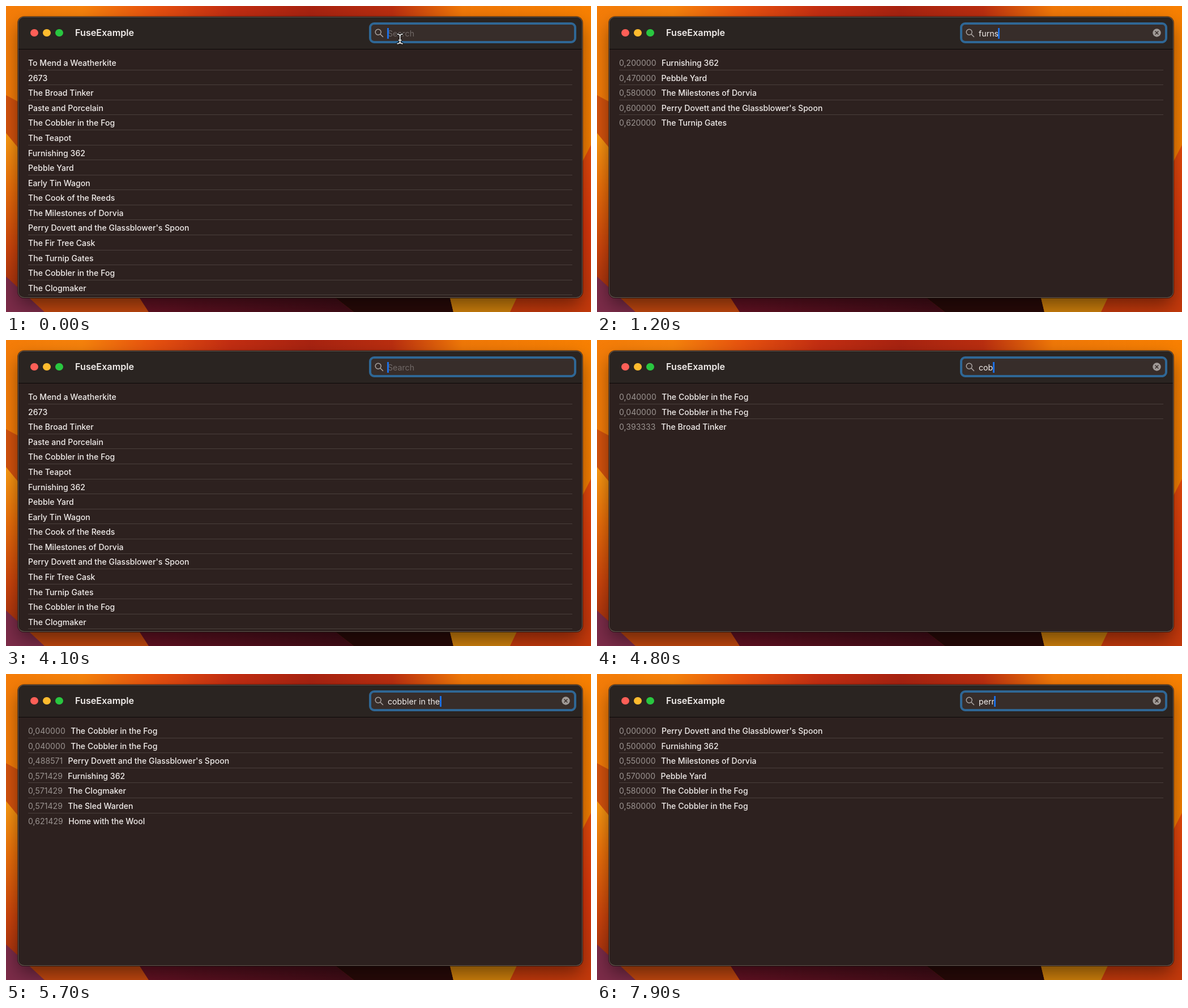
An HTML page that plays this animation: 1033 px wide and 542 px high, repeating every 8000 ms.

```html
<!DOCTYPE html>
<html lang="en">
<head>
<meta charset="utf-8">
<title>FuseExample</title>
<style>
html, body { margin: 0; width: 100%; height: 100%; overflow: hidden; background: #b5360f; }
body { position: relative; font: 450 14.1px/27px Inter, sans-serif; color: #f1edeb; }
body > *, .win > *, .bar > *, .field > * { position: absolute; }
.win {
  left: 22px; top: 20px; width: 995px; height: 496px; border-radius: 10px; background: #2d211f;
  box-shadow: 0 0 0 1px #65584f, 0 0 0 2px rgba(0,0,0,.55), 0 14px 32px rgba(0,0,0,.45);
  overflow: hidden;
}
.bar { left: 0; top: 0; width: 100%; height: 56px; background: #2a2421; border-bottom: 1px solid #0c0807; }
.dot { top: 21px; width: 13.4px; height: 13.4px; border-radius: 50%; }
h1 { margin: 0; left: 100px; top: 14px; font-size: 16.2px; font-weight: 600; line-height: 27px; }
.field {
  left: 619px; top: 9px; width: 358px; height: 29px; border: 4px solid #2f6795;
  border-radius: 9px; background: #372d2a;
}
#hint, #query { left: 29px; top: 2px; white-space: pre; font-weight: 400; font-size: 14.2px; }
#hint { color: #716967; }
#query .sel { background: #3f638b; }
#caret { top: 6px; width: 3px; height: 19px; background: #1c6fe4; }
#list { left: 17px; top: 67.2px; width: 961px; }
.row { height: 25.57px; border-bottom: 1px solid #4a3f3c; white-space: pre; }
.found .row:last-child { border-color: transparent; }
.row b { font-weight: 400; color: #9a9390; margin-right: 9.4px; }
</style>
</head>
<body>
<svg width="1033" height="542" viewBox="0 0 1033 542">
  <defs>
    <linearGradient id="top">
      <stop offset="0" stop-color="#f47c08"/><stop offset=".13" stop-color="#f6820c"/>
      <stop offset=".25" stop-color="#e8520f"/><stop offset=".38" stop-color="#c42e12"/>
      <stop offset=".52" stop-color="#a82311"/><stop offset=".66" stop-color="#ba2e10"/>
      <stop offset=".78" stop-color="#f07808"/><stop offset="1" stop-color="#f88002"/>
    </linearGradient>
    <linearGradient id="left" x2="0" y2="1">
      <stop offset="0" stop-color="#fc9c12"/><stop offset=".3" stop-color="#ec700a"/>
      <stop offset=".65" stop-color="#cc440c"/><stop offset="1" stop-color="#962a10"/>
    </linearGradient>
    <linearGradient id="right" x2="0" y2="1">
      <stop offset="0" stop-color="#e84c0c"/><stop offset=".5" stop-color="#de380c"/>
      <stop offset="1" stop-color="#c43a0c"/>
    </linearGradient>
    <linearGradient id="low">
      <stop offset="0" stop-color="#661224"/><stop offset="1" stop-color="#420d17"/>
    </linearGradient>
  </defs>
  <path fill="url(#top)" d="M0 0H1033V542H0z"/>
  <path fill="#d4520d" d="M0 158L60 190V300H0z"/>
  <path fill="url(#left)" d="M0 225L260 542H0z"/>
  <path fill="#c2480f" d="M20 500H225L252 542H60z"/>
  <path fill="#7c2c49" d="M0 479L68 542H0z"/>
  <path fill="url(#low)" d="M225 500H560L614 542H252z"/>
  <path fill="#280a08" d="M560 500H780L790 542H614z"/>
  <path fill="#d0810c" d="M780 500H910L890 542H790z"/>
  <path fill="url(#right)" d="M1033 246L990 330L910 500L890 542H1033z"/>
</svg>

<div class="win">
  <div class="bar">
    <i class="dot" style="left:21.3px;background:#fe5f57"></i>
    <i class="dot" style="left:43.3px;background:#febb2e"></i>
    <i class="dot" style="left:65.3px;background:#29c740"></i>
    <h1>FuseExample</h1>
    <div class="field">
      <svg width="358" height="29" fill="none" stroke-linecap="round">
        <path d="M17.2 13.3a5 5 0 1 0-10 0a5 5 0 1 0 10 0M16 17l4.5 4.5" stroke="#aaa4a1" stroke-width="1.5"/>
        <g id="clear">
          <circle cx="343.5" cy="14.5" r="7.2" fill="#a09a97"/>
          <path d="M341 12l5 5m0-5l-5 5" stroke="#372d2a" stroke-width="1.5"/>
        </g>
      </svg>
      <div id="hint">Search</div>
      <div id="query"><span></span></div>
      <i id="caret"></i>
    </div>
  </div>
  <div id="list"></div>
</div>

<svg id="pointer" style="left:687px;top:47px" width="18" height="22" fill="none" stroke-linecap="round">
  <defs>
    <path id="beam" d="M4 2.8Q8.7 2.8 8.7 6.5V16Q8.7 19.7 4 19.7M13.4 2.8Q8.7 2.8 8.7 6.5M13.4 19.7Q8.7 19.7 8.7 16M6.2 13.5H11.2"/>
  </defs>
  <use href="#beam" stroke="#111" stroke-width="3.8"/>
  <use href="#beam" stroke="#fff" stroke-width="1.6"/>
</svg>

<script>
const titles = [
  "To Mend a Weatherkite", "2673", "The Broad Tinker", "Paste and Porcelain",
  "The Cobbler in the Fog", "The Teapot", "Furnishing 362", "Pebble Yard",
  "Early Tin Wagon", "The Cook of the Reeds", "The Milestones of Dorvia",
  "Perry Dovett and the Glassblower's Spoon", "The Fir Tree Cask", "The Turnip Gates",
  "The Cobbler in the Fog", "The Clogmaker", "Home with the Wool", "The Sled Warden"
];

// Result lists: "title score" pairs, best match first
const pair = "4 .04,14 .04";
const tail = ",16 .6,17 .6";
const crowd = pair + [11, 6, 15, 17, 16, 2, 9, 10, 0, 3, 12, 13, 7, 8]
  .map((n, i) => `,${n} ${.5 + i / 100}`).join("");
const inThe = pair + ",11 .488571,6 .571429,15 .571429,17 .571429,16 .621429";
const inFog = pair + ",11 .504444,15 .555556,17 .595556";

// time, query, results (none = whole library), mode
const steps = [
  [0, "", "", "pointer"],
  [300, "f", "6 0,7 .07,9 .1,10 .16"],
  [500, "fu", "6 0,7 .07,11 .51,8 .52,15 .54,4 .55,14 .55,12 .55,3 .56,0 .58,9 .6,2 .61,13 .62,10 .66"],
  [700, "fur", "6 0,7 .403333"],
  [900, "furn", "6 0,7 .32,11 .5,10 .55"],
  [1000, "furn", "6 0,7 .32,11 .5,10 .55,13 .57"],
  [1200, "furns", "6 .2,7 .47,10 .58,11 .6,13 .62"],
  [1300, "furnsi", "6 .166667" + tail],
  [1700, "furnsih", "6 .285714" + tail],
  [1800, "furnsihi", "6 .25" + tail],
  [1900, "furnsihin", "6 .222222" + tail],
  [2100, "furnsihing", "6 .2" + tail],
  [2200, "furnsihing ", "6 .2" + tail],
  [2500, "furnsihing 3", "6 .166667" + tail],
  [2700, "furnsihing 36", "6 .153846"],
  [2900, "furnsihing 362", "6 .142857"],
  [3400, "furnsihing 362", "6 .142857", "blink"],
  [3600, "furnsihing 362", "6 .142857", "select"],
  [3700, "", ""],
  [4500, "c", pair + ",10 .04,15 .06,12 .1,0 .12,3 .17"],
  [4600, "co", crowd],
  [4800, "cob", pair + ",2 .393333"],
  [4900, "cobb", pair + ",2 .56,15 .56"],
  [5000, "cobbl", pair + ",15 .46"],
  [5100, "cobble", pair + ",15 .393333,10 .54"],
  [5200, "cobbler", pair + ",15 .468571,13 .611429"],
  [5300, "cobbler ", crowd],
  [5400, "cobbler in", crowd],
  [5500, "cobbler in t", inThe],
  [5600, "cobbler in th", inThe],
  [5700, "cobbler in the", inThe],
  [5800, "cobbler in the ", inThe],
  [6000, "cobbler in the f", inThe],
  [6200, "cobbler in the fo", inFog],
  [6400, "cobbler in the fog", inFog],
  [6800, "cobbler in the fog", inFog, "blink"],
  [7000, "cobbler in the fog", inFog],
  [7100, "cobbler in the fog", inFog, "select"],
  [7400, "", ""],
  [7700, "p", "11 0,3 .01,5 .07,13 .08"],
  [7800, "per", "11 0,6 .39,4 .403333,14 .403333"],
  [7900, "perr", "11 0,6 .5,10 .55,7 .57,4 .58,14 .58"]
];

const $ = id => document.getElementById(id);
const show = (id, on) => $(id).style.visibility = on ? "visible" : "hidden";
const text = $("query").firstChild;
let shown;

function row(title, score) {
  const el = document.createElement("div");
  el.className = "row";
  if (score !== undefined) {
    const num = document.createElement("b");
    num.textContent = (+score).toFixed(6).replace(".", ",");
    el.append(num);
  }
  el.append(title);
  return el;
}

function draw([, query, results, mode]) {
  text.textContent = query;
  text.className = mode === "select" ? "sel" : "";
  $("caret").style.left = 28.4 + text.getBoundingClientRect().width + "px";
  show("caret", mode !== "blink" && mode !== "select");
  show("pointer", mode === "pointer");
  show("hint", !query);
  show("clear", query);
  const rows = results
    ? results.split(",").map(r => { const [n, score] = r.split(" "); return row(titles[n], score); })
    : titles.map(t => row(t));
  $("list").className = results ? "found" : "";
  $("list").replaceChildren(...rows);
}

function tick() {
  const t = performance.now() % 8000;
  const step = steps.findLast(s => s[0] <= t);
  if (step !== shown) draw(shown = step);
  requestAnimationFrame(tick);
}
tick();
</script>
</body>
</html>
```
